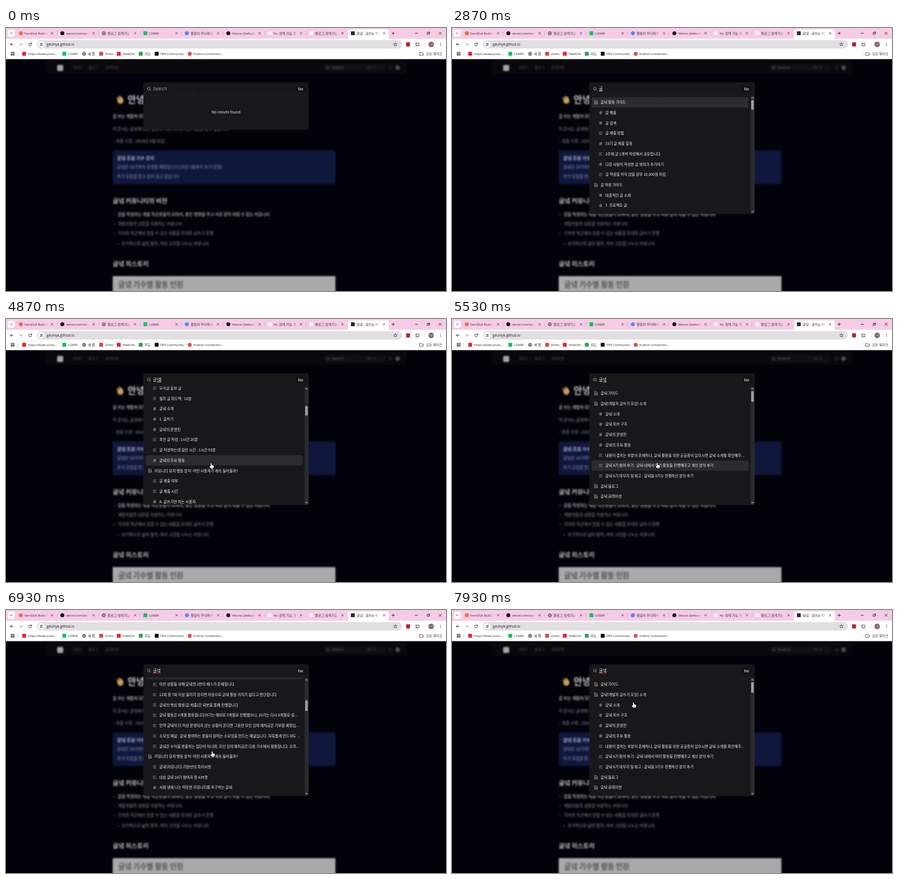
Recreate the animation shown at these times as an HTML page with a canvas. Size 800 by 477 pixels, loop 8 s.

```html
<!DOCTYPE html>
<html lang="ko">
<head>
<meta charset="utf-8">
<title>Search dialog</title>
<style>
html, body { margin: 0; width: 100%; height: 100%; overflow: hidden; background: #02030a; }
canvas { display: block; width: 800px; height: 477px; }
</style>
</head>
<body>
<canvas id="stage" width="800" height="477"></canvas>
<script>
const LOOP = 8000, PITCH = 18.72, FIRST_ROW = 134.8;
const LIST = { x: 250, top: 122.5, bottom: 337 };
const KO = '"Noto Sans CJK KR", "Noto Sans CJK", sans-serif';
const UI = '"Open Sans", ' + KO;
const INTER = 'Inter, ' + KO;
const stage = document.getElementById('stage');
const screen = stage.getContext('2d');
let g = screen;

// Drawing helpers
function box(x, y, w, h, fill, r = 0) {
  g.fillStyle = fill;
  g.beginPath();
  g.roundRect(x, y, w, h, r);
  g.fill();
}
function dot(x, y, r, fill) {
  g.fillStyle = fill;
  g.beginPath();
  g.arc(x, y, r, 0, 7);
  g.fill();
}
function ring(x, y, r, color, width = 0.8) {
  g.strokeStyle = color;
  g.lineWidth = width;
  g.beginPath();
  g.arc(x, y, r, 0, 7);
  g.stroke();
}
function stroke(path, x, y, color, width = 0.9) {
  g.save();
  g.translate(x, y);
  g.strokeStyle = color;
  g.lineWidth = width;
  g.lineCap = g.lineJoin = 'round';
  g.stroke(new Path2D(path));
  g.restore();
}
function text(str, x, y, size, color, { family = KO, weight = 400, align = 'left' } = {}) {
  g.font = `${weight} ${size}px ${family}`;
  g.fillStyle = color;
  g.textAlign = align;
  g.textBaseline = 'alphabetic';
  g.fillText(str, x, y + size * 0.36);
  return g.measureText(str).width;
}
function globe(x, y) {
  dot(x, y, 3.5, '#5f6368');
  stroke('M-2.5 -1.2L0 -.3L-.6 1.8M.8 -2.6L2.4 -.6M1 1.4L2 .8', x, y, '#fbe6f4', 0.8);
}
function mark(kind, x, y, color) {
  if (kind === 'globe') globe(x, y);
  else if (kind === 'square') box(x - 3.5, y - 3.5, 7, 7, color, 0.8);
  else dot(x, y, 3.6, color);
}

// Browser frame
const TABS = [
  ['dot', '#ee6c3c', 'FernDok Build Y', 5.8],
  ['dot', '#000', 'vercel.com/seo-r', 5.8],
  ['globe', '', '블로그 검색기능', 6.1],
  ['square', '#03c75a', 'LOMIR', 5.8],
  ['dot', '#4a8af0', '옆집이 무너져서', 6.1],
  ['dot', '#15151b', 'Veluno (default)', 5.8],
  ['dot', '#f7f7f9', 'fix: 검색 기능 개', 6.1],
  ['square', '#fff3f0', '블로그 검색기능', 6.1],
  ['square', '#2a2a2e', '글녘 - 글쓰는 마', 6.1]
];
const BOOKMARKS = [
  ['square', 33, '#e8222c', 'https://www.youtu...', 5.6],
  ['square', 106, '#03c75a', 'LOMIR', 5.6],
  ['globe', 142, '', '새 탭', 6.1],
  ['square', 173, '#d9473a', 'Zorbo', 5.6],
  ['square', 205, '#f0202a', 'ViewOrb', 5.6],
  ['square', 245, '#2e9d55', '지도', 6.1],
  ['square', 274, '#0a0a0a', 'FEN Community', 5.6],
  ['dot', 334, '#e5484d', 'Kodnst Convention...', 5.6]
];
const INK = '#2a282b', BAR = '#fff';

function drawTabs() {
  box(0, 0, 800, 20, '#f6cbe6');
  box(3, 3, 13, 13, BAR, 4);
  stroke('M-2 -1L0 1L2 -1', 9.5, 9.5, INK);
  box(622, 2.5, 74, 18, BAR, 4);
  TABS.forEach(([kind, color, label, size], i) => {
    const x = 27 + i * 75.45;
    mark(kind, x, 9.5, color);
    const fade = g.createLinearGradient(x + 40, 0, x + 50, 0);
    fade.addColorStop(0, INK);
    fade.addColorStop(1, 'rgba(42,40,43,0)');
    g.save();
    g.beginPath();
    g.rect(x, 0, 51, 20);
    g.clip();
    text(label, x + 6.7, 9.6, size, fade, { family: UI });
    g.restore();
    stroke('M-1.7 -1.7L1.7 1.7M1.7 -1.7L-1.7 1.7', x + 56.8, 9.5, INK, 0.8);
    if (i < 7) box(x + 65.5, 6, 0.7, 7, '#c99fb9');
  });
  stroke('M-2.4 0H2.4M0 -2.4V2.4', 704, 9.5, INK);
  stroke('M-2.3 0H2.3', 746, 9.5, '#222');
  stroke('M-2 -1.2H1.2V2H-2ZM-1 -2.2H2.2V1', 768, 9.5, '#222', 0.8);
  stroke('M-2.2 -2.2L2.2 2.2M2.2 -2.2L-2.2 2.2', 789.3, 9.5, '#222');
}
function drawToolbar() {
  box(0, 19.5, 800, 36.9, BAR);
  stroke('M2.6 0H-2.6M-.2 -2.4L-2.6 0L-.2 2.4', 10.5, 29.7, INK);
  stroke('M-2.6 0H2.6M.2 -2.4L2.6 0L.2 2.4', 27, 29.7, '#a5a2a5');
  stroke('M2.3 -1.3A2.6 2.6 0 1 0 2.6 .6M2.6 -2.7V-1H.8', 44, 29.7, INK);
  box(56, 22, 664, 15.3, '#e1dfe1', 7.6);
  dot(64.2, 29.7, 5.8, BAR);
  stroke('M-2.4 -1.4H.2M1.6 -1.4H2.4M-2.4 1.4H-1.4M0 1.4H2.4', 64.2, 29.7, INK, 0.8);
  ring(64.9, 28.3, 0.8, INK, 0.7);
  ring(63.4, 31.1, 0.8, INK, 0.7);
  text('geulnyk.github.io', 74, 29.7, 6.3, '#1f1b22', { family: UI });
  stroke('M0 -3.2L1 -1.1L3.2 -.9L1.5 .6L2 2.8L0 1.6L-2 2.8L-1.5 .6L-3.2 -.9L-1 -1.1Z', 708, 29.7, INK, 0.7);
  box(727.5, 26, 7, 7.5, '#b3202c', 0.8);
  stroke('M-2.6 -1.8H-1A1.1 1.1 0 0 1 1.1 -1.8H2.6V.1A1 1 0 0 1 2.6 2V3H-2.6V1.8A1 1 0 0 0 -2.6 -.2Z', 748, 29.4, INK, 0.9);
  box(761, 26, 0.7, 7.5, '#efbfdc');
  dot(773, 29.7, 5, '#75625c');
  text('나무', 773, 29.7, 4.2, '#efe6e2', { align: 'center' });
  for (let i = -1; i < 2; i++) dot(790, 29.7 + i * 2.2, 0.65, INK);
}
function drawBookmarks() {
  for (let i = 0; i < 4; i++) {
    g.strokeStyle = INK;
    g.lineWidth = 0.8;
    g.strokeRect(9.2 + (i % 2) * 3.6, 43.9 + (i >> 1) * 3.6, 2.1, 2.1);
  }
  box(20.5, 43, 0.7, 8, '#efbfdc');
  BOOKMARKS.forEach(([kind, x, color, label, size]) => {
    mark(kind, x, 46.8, color);
    text(label, x + 7, 46.9, size, INK, { family: UI });
  });
  box(745.8, 43, 0.7, 8, '#efbfdc');
  stroke('M-3.2 -2.4H-.8L.2 -1.4H3.2V2.5H-3.2Z', 755.5, 46.8, INK, 0.8);
  text('모든 북마크', 764, 46.9, 6, INK);
}

// Blurred page behind the dialog
function drawPage() {
  box(0, 56, 800, 421, '#02030a');
  g.filter = 'blur(1.8px)';
  box(72, 50, 656, 33, '#09090d', 4);
  box(93, 67, 11, 11, '#a5a5a9', 2);
  [['가이드', 121], ['블로그', 150], ['큐레이션', 180]].forEach(([s, x]) => text(s, x, 72, 6.6, '#56565b'));
  box(578, 65, 111, 14, '#101014', 4);
  ring(585, 72, 2.5, '#77777c');
  text('Search', 592, 72, 6.8, '#68686d', { family: INTER });
  text('Ctrl  K', 656, 72, 5.6, '#55555a', { family: INTER });
  ring(699, 72, 2.6, '#4a4a50');
  dot(712, 72, 4.2, '#4c4c50');

  const bold = { weight: 700 };
  const body = '#929296', bright = '#c0c0c2';
  dot(208, 132, 5.5, '#c39a55');
  stroke('M-4 -3L2 3M-1 -6L4 0M3 -5L5 1', 206, 130, '#cba262', 2.2);
  text('안녕하세요', 221, 130, 17, '#c9c9cb', bold);
  text('글 쓰는 개발자 모임, 글녘', 194, 160, 7.6, '#acacaf', bold);
  text('이 문서는 글녘에 대한 설명과 커뮤니티에 대한 내용을 담고 있습니다', 194, 183, 7.6, body);
  text('– 최종 수정 : 2024년 8월 05일', 194, 205.5, 7.6, body);
  box(194, 222, 405, 61, '#10173d', 4);
  text('글녘 후원 기수 공지', 202, 236, 8.4, '#c0c3d4', bold);
  text('글녘은 10기까지 운영될 예정입니다(25년 3월까지 10기 운영)', 202, 252.5, 7.6, '#969bb8');
  text('추가 모집을 받고 있지 않고 있습니다', 202, 269, 7.6, '#969bb8');
  text('글녘 커뮤니티의 비전', 194, 313.5, 11.4, bright, bold);
  [
    [203, 338.5, '글을 작성하는 개발 직군분들이 모여서, 좋은 영향을 주고 서로 같이 자랄 수 있는 커뮤니티', 700],
    [203, 355.5, '개발자들의 성장을 지원하는 커뮤니티', 400],
    [203, 372.5, '각자의 직군에서 얻을 수 있는 내용을 토대로 글쓰기 진행', 400],
    [210, 391, '부가적으로 삶의 철학, 여러 고민을 나누는 커뮤니티', 400]
  ].forEach(([x, y, s, weight]) => {
    const color = weight === 700 ? '#a2a2a6' : body;
    text('–', x - 8, y, 7.6, color, bold);
    text(s, x, y, 7.6, color, { weight });
  });
  text('글녘 히스토리', 194, 427.5, 11.4, bright, bold);
  box(194, 450, 405, 40, '#a9a9ab');
  text('글녘 기수별 활동 인원', 204, 465, 13.2, '#505054', bold);
  g.filter = 'none';
}

// Search results: p = page, # = heading, = text
const PAGE_ROW = 'p커뮤니티 유저 행동 분석: 어떤 사용자가 계속 들어올까?';
const RESULTS = [
  [
    'p글녘 활동 가이드', '#글 제출', '#글 검색', '=글 제출 방법', '#10기 글 제출 일정',
    '=2주에 글 1개씩 작성해서 공유합니다', '#다른 사람이 작성한 글 북마크 추가하기',
    '=글 작성을 하지 않을 경우 10,000원 차감', 'p글 작성 가이드', '#대표적인 글 소재',
    '#7. 프로젝트 글', '#글 작성 방법', '=글 피드백 : 20분', 'p글녘 소개', '=글 쓰는 시간',
    '=모각글 홍보 글', '=셀프 글 피드백 : 10분', '#글녘 소개', '#1. 글쓰기', '#글녘의 운영진',
    '=초안 글 작성 : 1시간 20분', '=글 작성하는데 걸린 시간 : 1시간 53분', '#글녘의 주요 활동',
    PAGE_ROW, '=글 제출 여부', '=글 제출 시간', '#A. 글쓰기만 하는 사용자', '#B. 글을 읽는 사용자'
  ],
  [
    'p글녘 가이드', 'p글녘(개발자 글쓰기 모임) 소개', '#글녘 소개', '#글녘 토브 구조', '#글녘의 운영진',
    '#글녘의 주요 활동', '=내용이 겹치는 부분이 존재하나, 글녘 활동을 위한 궁금증이 있으시면 글녘 소개를 확인해주...',
    '=글녘 8기 참여 후기 : 글녘 내에서 여러 활동을 진행해주고 계신 분의 후기',
    '=글녘 8기 마무리 및 회고 : 글녘을 3기수 진행하신 분의 후기', 'p글녘 블로그', 'p글녘 큐레이션',
    '=글녘 큐레이션 모음', 'p글녘 활동 가이드', '#글녘 활동 방법', '=글녘 활동 기간 안내', '#글녘 채널 구조',
    '=글녘 공지 채널', '=글녘 참여 방법', '#글녘 예치금', '=글녘 예치금 안내',
    '=이런 상황을 위해 글녘엔 2번의 패스가 존재합니다',
    '=12회 중 7회 이상 올리지 않으면 자동으로 글녘 활동 의지가 없다고 판단합니다',
    '=글녘의 핵심 활동(글 제출)은 녘봇을 통해 진행합니다',
    '=글녘 활동은 6개월 활동합니다(9기는 예외로 5개월로 진행했으나, 10기는 다시 6개월로 설...',
    '=만약 글녘이 더 이상 운영되지 않는 상황이 온다면 그동안 모인 잉여 예치금은 기부할 예정입...',
    '=소모임 채널 : 글녘 참여하는 분들이 원하는 소모임을 만드는 채널입니다. 자유롭게 만드셔도 ...',
    '=글녘은 수익을 창출하는 집단이 아니며, 모인 잉여 예치금은 다음 기수에서 활용합니다. 오프...',
    PAGE_ROW, '=글녘(커뮤니티) 리텐션의 특이사항', '=대상 글녘 10기 참여자 총 639명',
    '#사람 냄새 나는 따뜻한 커뮤니티를 추구하는 글녘', '=글녘 참여자 분석'
  ]
];
const THUMBS = [{ h: 17.5, rate: 27 / 290.2 }, { h: 19.5, rate: 33 / 374.4 }];
const ICONS = {
  p: 'M-2.4 -3H.8L2.4 -1.4V3H-2.4ZM-1 -.4H1M-1 1.3H1',
  '#': 'M-2.2 -1H2.4M-2.4 1.1H2.2M-.6 -2.6L-1.2 2.6M1.3 -2.6L.7 2.6',
  '=': 'M-2.7 -2.1H2.7M-2.7 0H1M-2.7 2.1H2.7'
};

// Timeline
const T = { letters: [930, 1110, 1290], found: 1670, second: [4560, 4740], refound: 5130, commit: 6200 };
const MOUSE = [
  [0, 341, 120], [1700, 341, 120], [2300, 376, 123], [2880, 376, 123], [3160, 376, 266],
  [4600, 376, 266], [4800, 374, 266], [5480, 374, 266], [5700, 376, 262],
  [6300, 376, 261], [7440, 376, 261], [7900, 331, 172], [LOOP, 331, 172]
];
const ease = u => u * u * (3 - 2 * u);
const ramp = (t, a, b) => ease(Math.min(1, Math.max(0, (t - a) / (b - a))));

function mouseAt(t) {
  const i = MOUSE.findIndex((k, n) => n && t <= k[0]);
  const [a, x0, y0] = MOUSE[i - 1], [b, x1, y1] = MOUSE[i];
  const u = ramp(t, a, b);
  return { x: x0 + (x1 - x0) * u, y: y0 + (y1 - y0) * u };
}
function scrollAt(t) {
  if (t < T.refound) return 290.2 * ramp(t, 3180, 3740);
  return 374.4 * (ramp(t, 6230, 6850) - ramp(t, 7000, 7440));
}
function activeRow(t, scroll, mouse) {
  if (t < 2880) return 0;
  const hovered = Math.round((mouse.y - 4 - FIRST_ROW + scroll) / PITCH);
  if (t < T.refound) return t > 3740 ? 22 : Math.max(0, hovered);
  if (t < 5480) return 0;
  if (t < 6230) return 7;
  return t > 6850 ? 19 : Math.min(19, Math.max(7, hovered));
}
function queryAt(t) {
  if (t >= T.second[1]) return '글녘';
  if (t >= T.second[0]) return '글ㄴ';
  return ['', 'ㄱ', '그', '글'][T.letters.filter(k => t >= k).length];
}

function drawQuery(t) {
  const query = queryAt(t), x = 267.2;
  ring(259.6, 109.8, 2.4, '#b4b4b8', 0.8);
  stroke('M0 0L1.6 1.6', 261.4, 111.6, '#b4b4b8', 0.8);
  if (!query) {
    text('Search', x, 110.4, 7.6, '#a0a0a5', { family: INTER });
  } else {
    const w = text(query, x, 110.4, 7.6, '#f2f2f4');
    if (t >= T.commit) {
      let wave = 'M0 0';
      for (let i = 1; i * 1.2 < w; i++) wave += `L${i * 1.2} ${i % 2 ? 0.7 : -0.2}`;
      stroke(wave, x, 114.6, '#e5383b', 0.8);
    } else {
      const from = query.length > 1 ? w / 2 : 0;
      box(x + from, 114.2, w - from, 0.7, '#d0d0d3');
      if (query.length > 1 && (t - T.second[0]) % 1060 < 640) box(x + w + 0.2, 106.3, 0.7, 8, '#ececee');
    }
  }
  box(527.5, 105, 17, 11, '#121214', 2);
  text('Esc', 536, 110.5, 5.6, '#f4f4f6', { family: INTER, weight: 600, align: 'center' });
}
function drawResults(t, mouse) {
  const which = t < T.refound ? 0 : 1;
  const scroll = scrollAt(t), active = activeRow(t, scroll, mouse);
  RESULTS[which].forEach((row, i) => {
    const y = FIRST_ROW + i * PITCH - scroll;
    if (y < 110 || y > 350) return;
    if (i === active) box(254, y - 9.4, 285, 18.8, '#2c2b2e', 2.5);
    const page = row[0] === 'p';
    stroke(ICONS[row[0]], page ? 262 : 270.3, y, page ? '#c4c4c8' : '#a2a2a7', 0.7);
    text(row.slice(1), page ? 270 : 278.8, y, 6.73, '#f8f8fa', { weight: 500 });
  });
  box(543, LIST.top, 7, 215, '#2b2b2d');
  stroke('M-1.8 .9L0 -1.1L1.8 .9Z', 546.4, 126, '#a0a0a2', 0.9);
  stroke('M-1.8 -.9L0 1.1L1.8 -.9Z', 546.4, 333.7, '#a0a0a2', 0.9);
  const { h, rate } = THUMBS[which];
  box(544, 130.8 + scroll * rate, 4.6, h, '#a0a0a2', 1.8);
}
function drawDialog(t, mouse) {
  const bottom = 184 + (LIST.bottom - 184) * ramp(t, T.found, T.found + 130);
  const h = bottom - 98.7;
  box(249.7, 98.7, 300.6, h + 0.3, '#242427', 4);
  box(250.2, 99.2, 299.6, h - 0.7, '#18171a', 3.6);
  drawQuery(t);
  box(250.2, 122, 299.6, 0.6, '#232326');
  if (t < T.found) {
    text('No results found', 400, 153, 6.67, '#f0f0f2', { family: INTER, align: 'center' });
    return;
  }
  g.save();
  g.beginPath();
  g.roundRect(250, LIST.top, 300, bottom - LIST.top, [0, 0, 4, 4]);
  g.clip();
  drawResults(t, mouse);
  g.restore();
}
function drawMouse({ x, y }) {
  if (y < 124) {
    const beam = 'M-1.5 -3.6H-.4M.4 -3.6H1.5M0 -3.2V3.2M-1.5 3.6H-.4M.4 3.6H1.5';
    stroke(beam, x, y, '#4a4a4d', 1.3);
    stroke(beam, x, y, '#000', 0.8);
    return;
  }
  const hand = 'M-1.9 -4.2Q-1.1 -5 -.4 -4.2V-1.2Q.4 -1.7 .9 -.9Q1.7 -1.3 2.1 -.5Q3.3 -.7 3.3 .6V2.4L2.5 4.5H-1.4L-3.6 1.3Q-3.6 .2 -2.6 .5L-1.9 1.2Z';
  g.save();
  g.translate(x, y + 0.4);
  g.scale(1.1, 1.1);
  stroke(hand, 0, 0, '#000', 1.4);
  g.fillStyle = '#fff';
  g.fill(new Path2D(hand));
  stroke('M.4 2V3.6M1.7 2V3.6', 0, 0, '#333', 0.4);
  g.restore();
}

function makeBackdrop() {
  const layer = document.createElement('canvas');
  layer.width = 800;
  layer.height = 477;
  g = layer.getContext('2d');
  drawPage();
  drawTabs();
  drawToolbar();
  drawBookmarks();
  g = screen;
  return layer;
}
const backdrop = makeBackdrop();
const start = performance.now();

function frame() {
  const t = (performance.now() - start) % LOOP;
  const mouse = mouseAt(t);
  g.drawImage(backdrop, 0, 0);
  drawDialog(t, mouse);
  drawMouse(mouse);
  requestAnimationFrame(frame);
}
frame();
</script>
</body>
</html>
```
